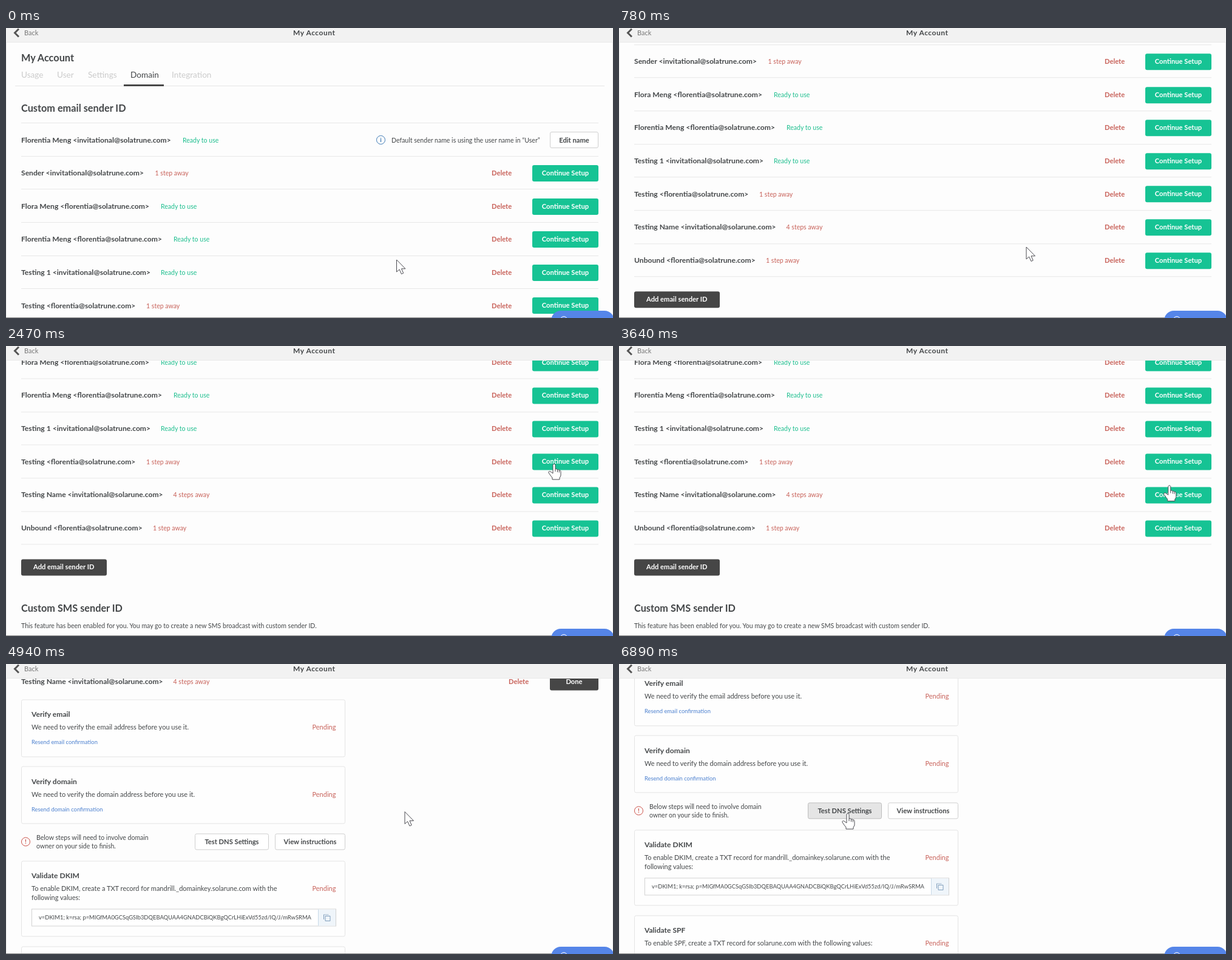
Animation, 1000 px wide and 478 px high, one loop 8000 ms. Source, as an HTML page:

```html
<!DOCTYPE html>
<html lang="en">
<head>
<meta charset="utf-8">
<title>My Account</title>
<style>
html, body { margin: 0; width: 100%; height: 100%; overflow: hidden; }
body { background: #fdfdfd; color: #444749; font: 11px Lato, sans-serif; }
#stage { position: relative; width: 1000px; height: 478px; overflow: hidden; background: #fdfdfd; }
#stage * { box-sizing: border-box; }
#stage div, #stage span, #stage svg { position: absolute; }
span { line-height: 20px; margin-top: -10px; white-space: nowrap; }
#page { left: 0; top: 0; width: 1000px; height: 1500px; }
#head { left: 0; top: 0; width: 1000px; height: 24px; background: #f2f2f2; border-bottom: 1px solid #eaeaea; }
#stage #rows { left: 25px; top: 156px; width: 951px; border-top: 1px solid #e8e8e8; }
#stage .row { position: relative; height: 54.66px; overflow: hidden; border-bottom: 1px solid #e8e8e8; }
.b { font-weight: 700; font-size: 11.2px; }
.h { font-weight: 700; font-size: 16.3px; }
.tab { font-size: 13.6px; color: #cbcbcb; }
.name { font-weight: 700; font-size: 12.15px; }
.small { font-size: 10.55px; }
.title { font-weight: 700; font-size: 12.1px; }
.link { font-size: 9.38px; color: #4c80cf; }
.ok { color: #1fbf8f; }
.bad { color: #c8625a; }
.btn { height: 27px; line-height: 26px; border-radius: 3px; font-weight: 700; font-size: 11.2px; text-align: center; white-space: nowrap; }
.go { background: #16c394; color: #fff; }
.dark { background: #464646; color: #fff; }
.plain { background: #fff; border: 1px solid #cfcfcf; }
.plain.hover { background: #e5e5e5; border-color: #bdbdbd; }
.card { left: 0; width: 534px; border: 1px solid #e4e4e4; border-radius: 3px; background: #fefefe; }
.ring { width: 15px; height: 15px; border: 1.4px solid; border-radius: 50%; line-height: 12px; text-align: center; font-weight: 700; font-size: 10px; }
.field { height: 29px; border: 1px solid #d2d2d2; background: #fff; }
.code { height: 27px; line-height: 27px; font-size: 9.38px; overflow: hidden; white-space: nowrap; }
</style>
</head>
<body>
<div id="stage">
  <div id="page"></div>
  <div id="head"></div>
  <div style="left:0;top:24px;width:1000px;height:454px;border:1px solid #e9e9e9;border-width:0 1px"></div>
  <div style="left:0;top:477px;width:1000px;height:1px;background:#858585"></div>
  <div style="left:898px;top:466px;width:104px;height:32px;border-radius:16px;background:#5585e8">
    <div style="left:15px;top:9px;width:12px;height:12px;border:1.3px solid #fff;border-radius:50%"></div>
  </div>
  <svg id="cursor" width="30" height="32" style="overflow:visible;left:0;top:0" stroke="#4a4a50" stroke-linejoin="round">
    <path id="arrow" fill="#fff" d="M0 0V20L4.6 16 8 23.5 11.2 22 8 14.8H14.5Z"/>
    <path id="hand" fill="#fff" d="M-2 2Q0-1.5 2 2V9Q4 7.5 5.5 10Q7.5 8.8 8.3 11Q11 10 11 14V19Q11 21 9 23V26H-3V23Q-5 21-9 15Q-9.5 11.5-6 13L-2 16ZM2 9V13M5.5 10V14M8.3 11V14.5"/>
  </svg>
</div>
<script>
const $ = id => document.getElementById(id);
const text = (x, y, s, cls = '') => `<span class="${cls}" style="left:${x}px;top:${y}px">${s}</span>`;
const box = (cls, x, y, w, s = '', id = '') =>
  `<div ${id && `id="${id}"`} class="${cls}" style="left:${x}px;top:${y}px;width:${w}px">${s}</div>`;
const ring = (x, y, s, color) =>
  `<div class="ring" style="left:${x}px;top:${y}px;color:${color}">${s}</div>`;

const inbox = 'invitational@solatrune.com', own = 'florentia@solatrune.com', host = 'solarune.com';
// name, address, status x, steps left
const senders = [
  ['Florentia Meng', inbox, 266, 0],
  ['Sender', inbox, 220.5, 1],
  ['Flora Meng', own, 230, 0],
  ['Florentia Meng', own, 251, 0],
  ['Testing 1', inbox, 230, 0],
  ['Testing', own, 206, 1],
  ['Testing Name', 'invitational@' + host, 250.5, 4],
  ['Unbound', own, 217, 1],
];

const card = (y, h, title, line, more) =>
  `<div class="card" style="top:${y}px;height:${h}px">` +
  text(16, 24.5, title, 'title') + text(16, 45.5, line) +
  text(478.5, 45.5, 'Pending', 'bad') + more + '</div>';

const verify = (y, what) => card(y, 95, 'Verify ' + what,
  `We need to verify the ${what} address before you use it.`,
  text(16, 70.5, `Resend ${what} confirmation`, 'link'));

const copyIcon = `<svg width="12" height="12" style="left:8px;top:8px" fill="none" stroke="#7f9dbb">
  <path d="M.5 8.5V.5H8.5M3 3H11V11H3Z"/></svg>`;
const key = 'v=DKIM1; k=rsa; p=MIGfMA0GCSqGSIb3DQEBAQUAA4GNADCBiQKBgQCrLHiExVd55zd/IQ/J/mRwSRMArL';
const field = y =>
  box('field', 16, y, 502, box('code', 11, 0, 449, key) +
    '<div style="left:471px;top:0;width:29px;height:27px;background:#eff5fa;border-left:1px solid #c9d9e8">' +
    copyIcon + '</div>');

const panel =
  verify(56, 'email') + verify(166.4, 'domain') +
  ring(0, 283.5, '!', '#cb5148') +
  text(25, 284, 'Below steps will need to involve domain', 'small') +
  text(25, 298.5, 'owner on your side to finish.', 'small') +
  box('btn plain', 286, 277.5, 122, 'Test DNS Settings', 'test') +
  box('btn plain', 418, 277.5, 116, 'View instructions') +
  card(322, 125, 'Validate DKIM',
    `To enable DKIM, create a TXT record for mandrill._domainkey.${host} with the`,
    text(16, 60.5, 'following values:') + field(78.5)) +
  card(463, 111, 'Validate SPF',
    `To enable SPF, create a TXT record for ${host} with the following values:`, field(64));

const row = ([name, mail, x, steps], i) =>
  `<div class="row" id="row${i}">` +
  text(0, 27.5, `${name} &lt;${mail}&gt;`, 'name') +
  text(x, 27.5, steps ? `${steps} step${steps > 1 ? 's' : ''} away` : 'Ready to use',
    'small ' + (steps ? 'bad' : 'ok')) +
  (i ? text(775, 27.5, 'Delete', 'b bad del') + box('btn go', 842, 14.2, 109, 'Continue Setup')
     : ring(585, 20, 'i', '#3b78b4') +
       text(610, 27.5, 'Default sender name is using the user name in “User”', 'small') +
       box('btn plain', 871, 14.2, 80, 'Edit name')) +
  (i === 6 ? panel : '') + '</div>';

$('page').innerHTML =
  text(25, 49, 'My Account', 'h') +
  [['Usage', 25], ['User', 84], ['Settings', 135], ['Domain', 205], ['Integration', 273]]
    .map(([s, x]) => text(x, 77, s, 'tab')).join('') +
  '<div style="left:15px;top:95px;width:971px;height:1px;background:#e6e6e6"></div>' +
  '<div style="left:194px;top:93px;width:66px;height:2.5px;background:#484848"></div>' +
  text(25, 132, 'Custom email sender ID', 'h') +
  `<div id="rows">${senders.map(row).join('')}` +
  box('btn dark', 0, 461, 140.5, 'Add email sender ID', 'add') + '</div>' +
  text(25, 699, 'Custom SMS sender ID', 'h sms') +
  text(25, 728, 'This feature has been enabled for you. You may go to create a new SMS broadcast with custom sender ID.', 'small sms');
document.querySelectorAll('.tab')[3].style.color = '#444749';

$('head').innerHTML =
  '<svg width="12" height="16" style="left:12px;top:0" fill="none" stroke="#555" stroke-width="3"><path d="M9 1.5 2.5 8 9 14.5"/></svg>' +
  text(30, 7.5, 'Back') + text(473, 8, 'My Account', 'b');
const [back, heading] = $('head').querySelectorAll('span');
back.style.color = '#777';
heading.style.cssText += 'font-size:12px;letter-spacing:.55px';

const clamp = (v, lo, hi) => Math.min(hi, Math.max(lo, v));
const ramp = (t, a, b) => clamp((t - a) / (b - a), 0, 1);

// time, x, y of the pointer tip
const path = [
  [390, 643.5, 382], [780, 671, 361], [1170, 671, 361], [2470, 903, 194],
  [2990, 903, 194], [3250, 905, 220], [3510, 905, 220], [3770, 908.5, 239],
  [4420, 908.5, 239], [4940, 657, 243.5], [5330, 657, 243.5], [6240, 128, 148], [6890, 377, 246],
];
function pointer(t) {
  let p = path[0];
  for (const q of path) {
    if (t < q[0]) {
      const k = ramp(t, p[0], q[0]), e = k * k * (3 - 2 * k);
      return [p[1] + (q[1] - p[1]) * e, p[2] + (q[2] - p[2]) * e];
    }
    p = q;
  }
  return [p[1], p[2]];
}

const target = $('row6'), action = target.querySelector('.btn.go'), del = target.querySelector('.del');
const followers = document.querySelectorAll('.sms');

function draw(now) {
  const t = Math.floor(now % 8000 / 130) * 130;
  const scroll = 266.6 * ramp(t, 332, 982) + 267 * ramp(t, 4420, 5063);
  $('page').style.transform = `translateY(${-scroll}px)`;

  const grow = clamp(0.71 * (t - 4141), 0, 540), open = grow > 0;
  target.style.height = 54.66 + grow + 'px';
  action.textContent = open ? 'Done' : 'Continue Setup';
  action.className = 'btn ' + (open ? 'dark' : 'go');
  action.style.left = (open ? 871 : 842) + 'px';
  action.style.width = (open ? 80 : 109) + 'px';
  del.style.left = (open ? 803 : 775) + 'px';
  $('add').style.top = 461 + grow + 'px';
  followers.forEach(s => s.style.transform = `translateY(${grow}px)`);

  const [x, y] = pointer(t);
  const onTest = t > 6240 && x > 311 && y > 229;
  const hand = x > 866 || onTest;
  $('test').classList.toggle('hover', onTest);
  $('arrow').style.display = hand ? 'none' : '';
  $('hand').style.display = hand ? '' : 'none';
  $('cursor').style.transform = `translate(${x}px,${y}px)`;
  requestAnimationFrame(() => draw(performance.now()));
}
draw(performance.now());
</script>
</body>
</html>
```
